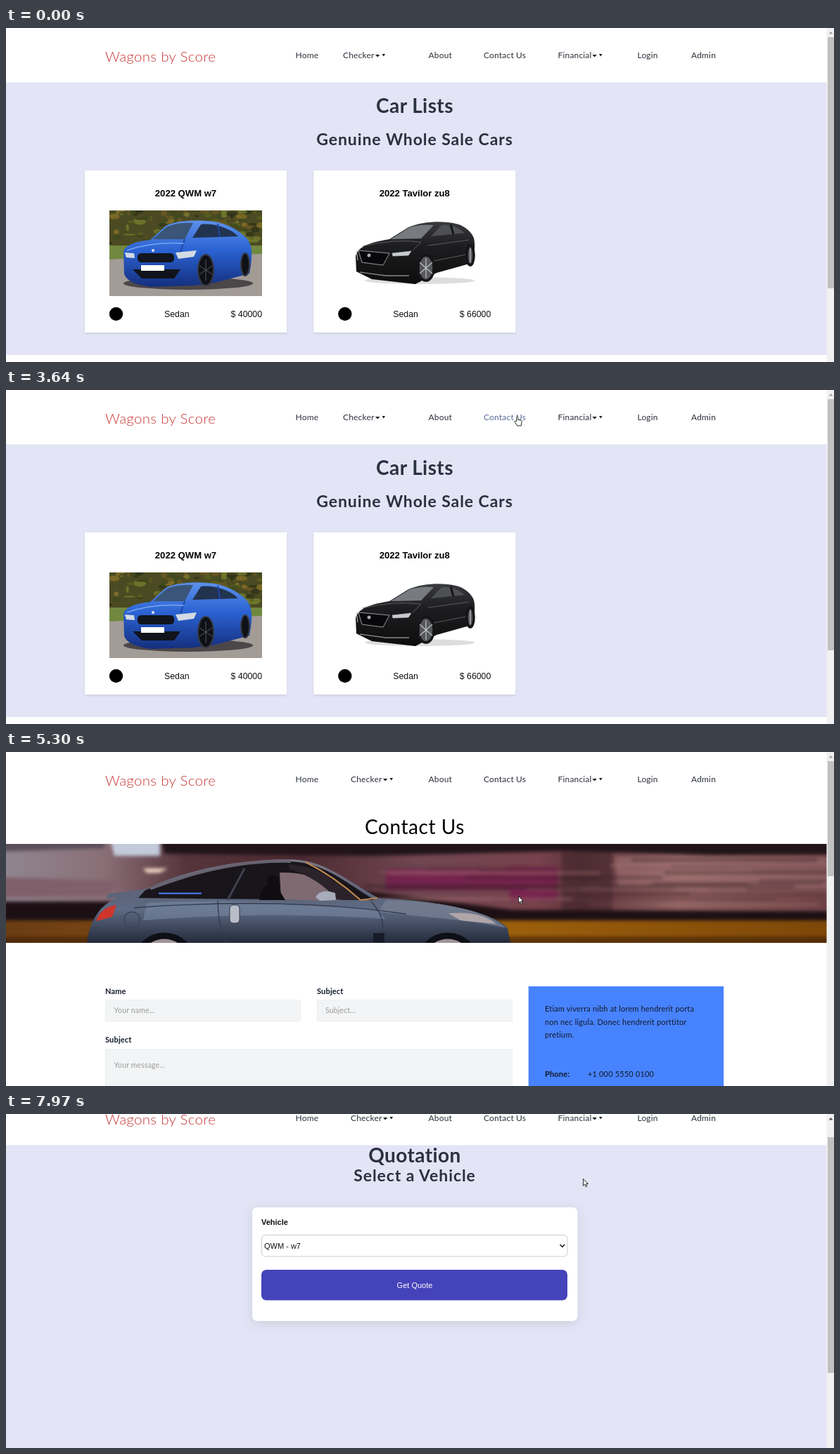
An HTML page for the animation above (8000 ms loop, 1177 by 476 pixels).

```html
<!DOCTYPE html>
<html lang="en">
<head>
<meta charset="utf-8">
<title>Car dealer walkthrough</title>
<style>
  html, body { margin: 0; width: 100%; height: 100%; overflow: hidden; background: #fff; }
  svg.stage { display: block; width: 100%; height: 100%; }
  text { font: 11px Lato, sans-serif; letter-spacing: .015em; fill: #111a2b; white-space: pre; }
  .nav text { font-size: 12px; fill: #2b303b; }
  .nav path { fill: #15181f; }
  .nav .brand { font-size: 20.5px; font-weight: 300; fill: #c93a3a; }
  .nav .soft text { fill: #56699a; }
  .nav .hot text, .nav .hot path { fill: #4883ff; }
  .mid { text-anchor: middle; }
  .h1 { font-size: 28px; font-weight: 700; fill: #2a3140; }
  .h2 { font-size: 23px; font-weight: 700; letter-spacing: .04em; fill: #2a3140; }
  .h3 { font-size: 18px; font-weight: 600; letter-spacing: .04em; }
  .title { font-size: 28px; letter-spacing: .02em; fill: #000; }
  .bold { font-weight: 700; }
  .button { font-size: 12px; font-weight: 500; }
  .hint { font-size: 10.5px; fill: #9b9b9b; }
  .wide { letter-spacing: .07em; }
  .ui { font-family: "Liberation Sans", Arial, sans-serif; letter-spacing: 0; fill: #111; }
  .name { font-size: 13.1px; font-weight: 700; fill: #000; }
  .spec { font-size: 12.3px; }
  .light { fill: #fff; }
  .field { fill: #f3f4f5; stroke: #eeeff0; }
  .card { fill: #fff; filter: drop-shadow(0 2px 1.5px #00000014); }
  .panel { fill: #fff; filter: drop-shadow(0 4px 8px #00000018); }
  .menu rect { fill: #fff; stroke: #ccc; filter: drop-shadow(0 5px 5px #00000030); }
  .pointer path { fill: #fff; stroke: #111; stroke-width: .9; stroke-linejoin: round; }
  .blur { filter: blur(2.5px); }
</style>
</head>
<body>
<svg class="stage" viewBox="0 0 1177 476" xmlns="http://www.w3.org/2000/svg">
  <defs>
    <linearGradient id="bluePaint" x2="0" y2="1">
      <stop stop-color="#5c91ec"/><stop offset=".45" stop-color="#2b62d2"/><stop offset="1" stop-color="#142f7e"/>
    </linearGradient>
    <linearGradient id="blackPaint" x2="0" y2="1">
      <stop stop-color="#3a3a3d"/><stop offset=".4" stop-color="#1d1d1f"/><stop offset="1" stop-color="#0d0d0e"/>
    </linearGradient>
    <linearGradient id="steel" x2="0" y2="1">
      <stop stop-color="#7b7683"/><stop offset=".42" stop-color="#5c6479"/><stop offset=".6" stop-color="#5d6b83"/>
      <stop offset=".8" stop-color="#414b60"/><stop offset="1" stop-color="#232a3a"/>
    </linearGradient>
    <linearGradient id="street">
      <stop stop-color="#8f858f"/><stop offset=".12" stop-color="#8a6f76"/><stop offset=".22" stop-color="#56343c"/>
      <stop offset=".36" stop-color="#4c2a31"/><stop offset=".5" stop-color="#714753"/><stop offset=".65" stop-color="#77424c"/>
      <stop offset=".7" stop-color="#5d343b"/><stop offset=".82" stop-color="#8e605f"/><stop offset="1" stop-color="#6e4245"/>
    </linearGradient>
    <linearGradient id="amber">
      <stop stop-color="#6b3d14"/><stop offset=".6" stop-color="#9c5f0c"/><stop offset="1" stop-color="#7c4608"/>
    </linearGradient>
  </defs>

  <g id="home" class="page">
    <rect y="77.5" width="1167" height="388.5" fill="#e3e4f5"/>
    <text class="h1 mid" x="581" y="121">Car Lists</text>
    <text class="h2 mid" x="581" y="167">Genuine Whole Sale Cars</text>
    <g id="cards"></g>
    <svg x="147" y="260" width="217" height="122">
      <rect width="217" height="122" fill="#4b4a22"/>
      <g id="leaves"></g>
      <rect y="50" width="217" height="24" fill="#71883f"/>
      <path d="M0 70 60 66 217 62V122H0Z" fill="#a39b96"/>
      <ellipse cx="112" cy="104" rx="92" ry="9" fill="#4b4648"/>
      <path d="M20 58C25 48 40 44 58 42L80 22C95 14 130 12 155 17 175 22 190 33 197 42 203 52 203 62 201 78L199 90 150 103 120 107 60 109C40 107 23 100 21 90Z" fill="url(#bluePaint)"/>
      <path d="M62 41 82 23C95 18 106 17 119 18L107 41Z" fill="#3a5577"/>
      <path d="M118 39 130 20C147 18 170 24 183 37Z" fill="#22334f"/>
      <path d="M154 19 157 38M107 41 98 68" stroke="#1c47a8" stroke-width="2"/>
      <path d="M25 57Q60 44 106 47" fill="none" stroke="#76a6f2" stroke-width="1.5"/>
      <path d="M94 60 124 57 120 66 98 69ZM22 60 35 61 36 68 24 67Z" fill="#d2dae2"/>
      <rect x="40" y="61" width="52" height="13" rx="5" fill="#11151d"/>
      <circle cx="62" cy="57" r="2" fill="#dfe5ec"/>
      <path d="M33 84H101L92 97H46Z" fill="#10131b"/>
      <rect x="45" y="78" width="33" height="8" fill="#fff"/>
      <g fill="#101116" stroke="#363a43" stroke-width="2">
        <ellipse cx="137" cy="85" rx="11" ry="22"/><ellipse cx="193" cy="77" rx="6" ry="16"/>
      </g>
      <path d="M137 70V100M128 79 146 91M128 91 146 79" stroke="#575b63"/>
    </svg>
    <ellipse cx="588" cy="360" rx="78" ry="5" fill="#ddd"/>
    <path d="M497 325C500 312 515 306 545 301L572 284C590 276 620 274 640 279 650 281 660 289 664 297 668 305 666 325 662 335L612 349 582 365 520 358 498 347Z" fill="url(#blackPaint)"/>
    <path d="M547 301 574 284Q590 279 608 281L590 300Z" fill="#777b7f"/>
    <path d="M604 297 619 281Q637 279 652 292Z" fill="#4d5054"/>
    <path d="M632 280 636 294" stroke="#161618" stroke-width="3"/>
    <path d="M507 311Q550 300 590 305L578 317M600 310 658 302M608 332 653 323" fill="none" stroke="#5b5b60"/>
    <path d="M501 317 545 321 536 338 506 334Z" fill="#08080a" stroke="#96989b"/>
    <path d="M549 321 576 318 572 324 550 325ZM498 317 500 331ZM587 329 592 326" fill="#c8cbce" stroke="#c8cbce" stroke-width=".6"/>
    <path d="M503 348 540 353 573 353" fill="none" stroke="#888" stroke-width="1.3"/>
    <circle cx="516" cy="324" r="2.5" fill="#a9abad"/>
    <g fill="#55575b" stroke="#151517" stroke-width="3.5">
      <ellipse cx="597" cy="342" rx="11" ry="18"/><ellipse cx="660" cy="324" rx="5" ry="14"/>
    </g>
    <path d="M597 328V356M588 334 606 350M588 350 606 334M660 314V334" stroke="#babcbf" stroke-width="1.3"/>
  </g>

  <g id="contact" class="page">
    <text class="title mid" x="581" y="117">Contact Us</text>
    <svg x="0" y="131" width="1167" height="141" viewBox="0 131 1167 141">
      <rect y="131" width="1167" height="141" fill="url(#street)"/>
      <g class="blur">
        <path d="M220 120H1190V146L1000 147 800 141 520 148 225 145Z" fill="#21151a"/>
        <path d="M-9 120H140V137L-9 142Z" fill="#5b4f5a"/>
        <path d="M147 120H219V148H154Z" fill="#c3cbdb"/>
        <path d="M-9 178 170 184 140 205-9 208Z" fill="#80606a"/>
        <path d="M195 166H230L218 172H200Z" fill="#f5dfca"/>
        <path d="M540 167H710V164H784V211H716V196H540Z" fill="#79154f" opacity=".65"/>
        <path d="M865 149H1190V198L870 192Z" fill="#b08080" opacity=".45"/>
        <path d="M790 142H862V228H790Z" fill="#3d2229" opacity=".5"/>
        <path d="M-9 213H150V240H-9ZM500 197 720 225 1190 227V245H500Z" fill="#1c1014"/>
        <path d="M-9 240H1190V290H-9Z" fill="url(#amber)"/>
        <path d="M-9 263H1190V290H-9Z" fill="#472407" opacity=".7"/>
      </g>
      <g id="streaks" class="blur"></g>
      <path d="M115 272C119 242 131 220 158 207L142 209 145 202 200 195C250 170 325 153 402 153 452 153 481 181 529 208 615 212 693 228 713 251L717 272Z" fill="url(#steel)"/>
      <path d="M540 211C630 212 690 230 711 251 660 239 600 236 530 228Z" fill="#798094" opacity=".7"/>
      <path d="M200 215Q350 207 525 225L540 238Q370 226 195 240Z" fill="#7786a0" opacity=".6"/>
      <path d="M198 197C262 169 330 156 402 156 451 157 480 184 524 211L270 209 188 208Z" fill="#18151b"/>
      <path d="M389 172C430 170 456 185 478 210L452 212 391 210Z" fill="#7f6a72"/>
      <path d="M402 160Q434 163 449 172L506 211 470 210Q446 181 402 166Z" fill="#2b2329"/>
      <path d="M360 211Q362 194 372 190C367 176 381 171 387 179 390 188 386 192 392 203L397 211Z" fill="#0f0d11"/>
      <path d="M315 211 339 166" stroke="#3e424e" stroke-width="3"/>
      <path d="M205 195Q312 153 405 156" fill="none" stroke="#676370" stroke-width="4"/>
      <path d="M426 157Q466 177 504 211L528 208" fill="none" stroke="#c0894f" stroke-width="2"/>
      <path d="M440 207Q447 194 468 201L469 211 446 212Z" fill="#a5acba"/>
      <path d="M301 212Q302 254 315 272M519 213Q546 242 529 272M182 222Q402 206 569 231" fill="none" stroke="#333b4d" stroke-width="1.3"/>
      <path d="M128 241Q135 221 157 218L151 235Z" fill="#cf352b"/>
      <path d="M629 230Q674 226 697 245L646 240Z" fill="#b0a5a8"/>
      <circle cx="179" cy="239" r="11" fill="none" stroke="#3b4559" stroke-width="1.5"/>
      <rect x="318" y="218" width="14" height="26" rx="5" fill="#b9bdc8" stroke="#323a49"/>
      <g fill="#a09298" stroke="#0e1017" stroke-width="9">
        <circle cx="225" cy="302" r="40"/><circle cx="628" cy="302" r="40"/>
      </g>
      <path d="M522 258H538V272H522Z" fill="#161c28"/>
      <path d="M217 201.5H278" stroke="#4f82ff" stroke-width="2"/>
    </svg>
    <text class="bold" x="141" y="345">Name</text>
    <text class="bold" x="442" y="345">Subject</text>
    <text class="bold" x="141" y="414">Subject</text>
    <rect class="field" x="141.5" y="353.5" width="277" height="30"/>
    <rect class="field" x="442.5" y="353.5" width="277" height="30"/>
    <rect class="field" x="141.5" y="423.5" width="578" height="123"/>
    <text class="hint" x="153.5" y="372">Your name...</text>
    <text class="hint" x="454" y="372">Subject...</text>
    <text class="hint" x="153.5" y="450">Your message...</text>
    <path d="M712 545 718 539M715.5 545.5 718.5 542.5" stroke="#444"/>
    <rect x="141" y="566" width="107" height="34" rx="3" fill="#4883ff"/>
    <text class="button mid" x="194.5" y="587">Send Message</text>
    <rect x="742.7" y="334" width="277.5" height="237" fill="#4883ff"/>
    <text x="766" y="370">Etiam viverra nibh at lorem hendrerit porta</text>
    <text x="766" y="388.5">non nec ligula. Donec hendrerit porttitor</text>
    <text x="766" y="407">pretium.</text>
    <text class="bold" x="766" y="463">Phone:</text>
    <text x="827" y="463" font-size="10.5">+1 000 5550 0100</text>
    <text class="bold" x="766" y="486">Email:</text>
    <text class="wide" x="827" y="486">writeto@sample.test</text>
    <text class="bold" x="766" y="509">Address:</text>
    <path d="M830.3 510 827.6 505.5A3.2 3.2 0 1 1 833 505.5ZM830.3 502.4A1.2 1.2 0 1 0 830.3 504.8 1.2 1.2 0 1 0 830.3 502.4Z" fill="#0c1220" fill-rule="evenodd"/>
    <text x="836" y="509">508 Quillmarsh Place Old Tarn</text>
    <rect y="662" width="1167" height="500" fill="#f7f7f7"/>
    <text class="h3 mid" x="581" y="749">You Can Find Us Here</text>
  </g>

  <g id="quote" class="page">
    <rect y="77.5" width="1167" height="560" fill="#e3e4f5"/>
    <text class="h1 mid" x="581" y="102">Quotation</text>
    <text class="h2 mid" x="581" y="128.5">Select a Vehicle</text>
    <rect class="panel" x="350" y="166" width="462.5" height="162" rx="7"/>
    <text class="ui bold" x="363" y="191">Vehicle</text>
    <rect x="363.5" y="205.5" width="434.5" height="30.5" rx="5" fill="#fff" stroke="#ccc"/>
    <text class="ui" x="367" y="224.5">QWM - w7</text>
    <path d="M787.5 219 790.8 222.5 794 219" fill="none" stroke="#111" stroke-width="1.5"/>
    <rect x="363" y="255" width="435" height="43.5" rx="7" fill="#4543b9"/>
    <text class="ui light mid" x="581" y="280.5">Get Quote</text>
  </g>

  <g id="nav" class="nav"><text class="brand" x="141" y="48">Wagons by Score</text></g>
  <g id="menu" class="menu">
    <rect y="77.5" width="123" rx="2"/>
    <text x="12" y="102">Quotation</text>
  </g>

  <rect x="1166.5" width="10.5" height="476" fill="#f1f1f1"/>
  <path id="upArrow" d="M1169.5 8.5 1172.5 5 1175.5 8.5Z"/>
  <rect id="thumb" x="1168" width="9" fill="#c1c1c1"/>

  <circle id="click" cx="820" cy="93" r="9.5" fill="#f6ef35" opacity=".8"/>
  <g id="pointer" class="pointer">
    <path id="arrow" d="M.5 .5V10.2L2.7 8.1 4.3 11.7 6 11 4.4 7.5H7.5Z"/>
    <path id="hand" d="M3.2 8V1.6C3.2 0 5.3 0 5.3 1.6V5.2L9.6 6.3C10.6 6.6 10.9 7.3 10.7 8.5L9.6 14H4.3L.8 8.8C0 7.4 1.5 6.5 2.4 7.4Z"/>
  </g>
</svg>
<script>
const $ = id => document.getElementById(id);
const show = (id, on) => { $(id).style.display = on ? '' : 'none'; };
const repeat = (count, make) => Array.from({ length: count }, (_, i) => make(i)).join('');
const LOOP = 8000;

const links = [['Home', 411.5], ['Checker', 490, 46], ['About', 600.5], ['Contact Us', 679],
  ['Financial', 784.5, 49], ['Login', 897.5], ['Admin', 974]];
const carets = x => `<path d="M${x} 38h6.4l-3.2 3.4zM${x + 9.5} 37h4.6l-2.3 3.6z"/>`;
$('nav').innerHTML += links.map(([label, x, caret]) =>
  `<g data-link="${label}" transform="translate(${x})"><text y="43">${label}</text>${caret ? carets(caret) : ''}</g>`).join('');
const items = [...document.querySelectorAll('[data-link]')];
const checker = items[1];

const card = (x, name, price) => `<g transform="translate(${x} 203)">
  <rect class="card" width="287" height="231"/>
  <text class="ui name mid" x="143.5" y="37">${name}</text>
  <circle cx="44.5" cy="204.5" r="9.7"/>
  <text class="ui spec" x="113" y="209">Sedan</text>
  <text class="ui spec" x="252" y="208.5" text-anchor="end">${price}</text></g>`;
$('cards').innerHTML = card(112, '2022 QWM w7', '$ 40000') + card(437.3, '2022 Tavilor zu8', '$ 66000');

let seed = 7;
const random = () => (seed = seed * 16807 % 2147483647) / 2147483647;
const greens = ['#2c3216', '#59601f', '#8a7428', '#3f4a1d', '#6d5a24', '#77802f'];
$('leaves').innerHTML = repeat(130, i =>
  `<ellipse cx="${random() * 217}" cy="${random() * 50}" rx="${2 + random() * 7}" ry="${1 + random() * 4}" fill="${greens[i % 6]}" opacity=".75"/>`);
const glows = ['#2a171d', '#a97474', '#4a2a31'];
$('streaks').innerHTML = repeat(36, i =>
  `<rect x="${480 + random() * 600}" y="${148 + random() * 72}" width="${80 + random() * 260}" height="${1 + random() * 4}" fill="${glows[i % 3]}" opacity=".4"/>`);

// Thumb height and travel per scrolled pixel.
const bars = { home: [358, .7], contact: [164, .298], quote: [336, .606] };

// Each step changes only what it names; link and menu states last one step.
const rest = { soft: [], hot: [], menu: null, click: false };
let last = { page: 'home', scroll: 0, cursor: '', x: 0, y: 0 };
const steps = [];
const at = (time, change = {}) => steps.push(last = { ...last, ...rest, ...change, time });
const arrow = (x, y) => ({ cursor: 'arrow', x, y });
const hand = (x, y) => ({ cursor: 'hand', x, y });
const menu = (x, height, opacity = 1) => ({ x, height, opacity });

at(0);
at(310, arrow(741, 289));
at(640, arrow(454, 149));
at(980, arrow(396, 66));
at(1310, { ...hand(463, 46), soft: ['Home'] });
at(1640, { ...hand(625, 43), soft: ['About'], hot: ['Checker'], menu: menu(467, 38) });
at(1970, { ...hand(638, 42), soft: ['Checker', 'About'] });
at(2310, { hot: ['About'] });
at(2640, { ...hand(707.5, 36.5), soft: ['About', 'Contact Us'] });
at(2970, { ...hand(737.5, 39), hot: ['Contact Us'] });
at(3300, { ...hand(722.5, 38.5), soft: ['Contact Us'] });
at(3640, { ...hand(722.5, 37), soft: ['Contact Us'] });
at(3980, { ...hand(723, 102.5), page: 'contact', soft: ['Contact Us'] });
at(4310, arrow(728, 205));
at(4640, { scroll: 315 });
at(4970, { scroll: 440 });
at(5300, { scroll: 0 });
at(5650, arrow(781, 100));
at(5990, { ...hand(812, 42), soft: ['Financial'], menu: menu(773.5, 43, .6) });
at(6310, { ...hand(815, 85), hot: ['Financial'], menu: menu(773.5, 43) });
at(6640, { ...hand(816.5, 92), soft: ['Financial'], menu: menu(773.5, 3.5) });
at(6990, { hot: ['Financial'], menu: menu(773.5, 3.5), click: true });
at(7320, { ...arrow(820, 92), page: 'quote' });
at(7970, { scroll: 33 });

function draw(s) {
  const shift = `translate(0 ${-s.scroll})`;
  for (const page in bars) show(page, page === s.page);
  $(s.page).setAttribute('transform', shift);
  $('nav').setAttribute('transform', shift);
  checker.setAttribute('transform', `translate(${s.page === 'home' ? 479 : 490})`);
  for (const item of items) {
    item.classList.toggle('soft', s.soft.includes(item.dataset.link));
    item.classList.toggle('hot', s.hot.includes(item.dataset.link));
  }
  show('menu', s.menu);
  if (s.menu) {
    const [box, label] = $('menu').children;
    $('menu').setAttribute('transform', `translate(${s.menu.x})`);
    $('menu').style.opacity = s.menu.opacity;
    box.setAttribute('height', s.menu.height);
    label.style.display = s.menu.height > 40 ? '' : 'none';
  }
  const [size, rate] = bars[s.page];
  $('thumb').setAttribute('y', 13 + s.scroll * rate);
  $('thumb').setAttribute('height', size);
  $('upArrow').setAttribute('fill', s.scroll ? '#505050' : '#a3a3a3');
  show('click', s.click);
  for (const shape of ['arrow', 'hand']) show(shape, shape === s.cursor);
  $('pointer').setAttribute('transform', `translate(${s.x} ${s.y})`);
}

let shown;
function tick() {
  const time = performance.now() % LOOP;
  const step = steps.findLast(s => s.time <= time);
  if (step !== shown) draw(shown = step);
  requestAnimationFrame(tick);
}
tick();
</script>
</body>
</html>
```
